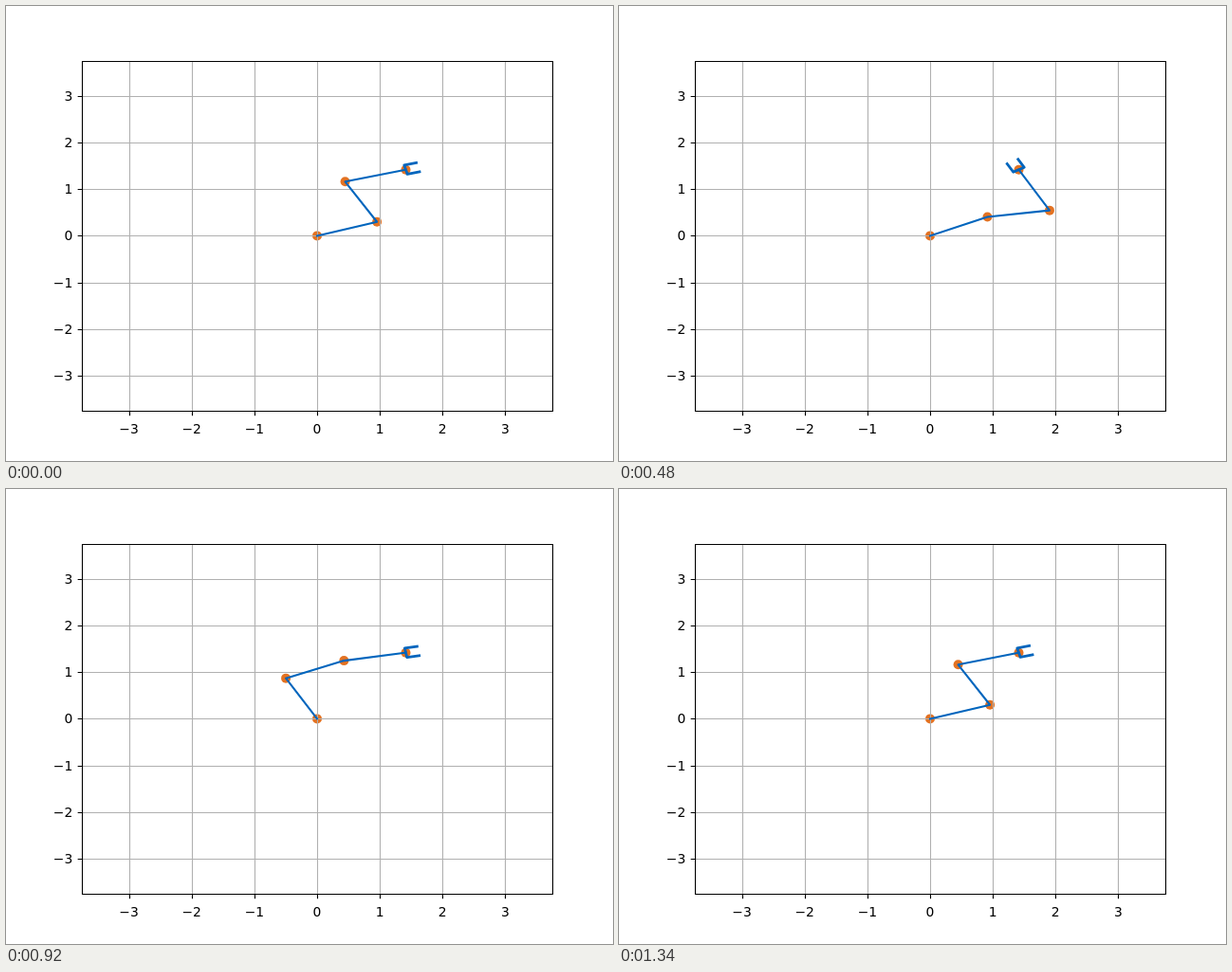
Recreate the animation shown at these times as an HTML page. Size 640 by 480 pixels, loop 1360 ms.

```html
<!DOCTYPE html>
<html lang="en">
<head>
<meta charset="utf-8">
<title>Three-link arm</title>
<style>
  html, body { margin: 0; width: 100%; height: 100%; overflow: hidden; background: #fff; }
  svg { display: block; width: 640px; height: 480px; }
  text { font: 13.89px "DejaVu Sans", sans-serif; }
  #grid, #axes { fill: none; stroke-width: 1.11; }
  #arm, #grip { fill: none; stroke: #0065bd; stroke-linecap: square; stroke-linejoin: round; }
</style>
</head>
<body>
<svg viewBox="0 0 640 480">
  <g id="joints" fill="#e37222"></g>
  <path id="grid" stroke="#b0b0b0"/>
  <path id="arm" stroke-width="2.08"/>
  <path id="grip" stroke-width="2.78"/>
  <path id="axes" stroke="#000"/>
  <g id="labels"></g>
</svg>
<script>
const STEP = 20, FRAMES = 68;
const END = [Math.SQRT2, Math.SQRT2];
const $ = id => document.getElementById(id);
const px = x => 328 + x * 496 / 7.5;
const py = y => 242.4 - y * 369.6 / 7.5;
const snap = v => Math.floor(v + 0.5) + 0.5;
const unit = a => [Math.cos(a), Math.sin(a)];
const add = (p, q, k = 1) => p.map((v, i) => v + k * q[i]);
const path = pts => 'M' + pts.map(([x, y]) => px(x).toFixed(2) + ' ' + py(y).toFixed(2)).join('L');

function make(tag, attrs, parent) {
  const el = document.createElementNS('http://www.w3.org/2000/svg', tag);
  for (const k in attrs) el.setAttribute(k, attrs[k]);
  return parent.appendChild(el);
}

function drawPlot() {
  let grid = '', axes = 'M80.5 58.5H576.5V427.5H80.5Z';
  const label = (n, x, y, anchor) => {
    make('text', { x, y, 'text-anchor': anchor }, $('labels')).textContent = n < 0 ? '\u2212' + -n : n;
  };
  for (let n = -3; n <= 3; n++) {
    const x = snap(px(n)), y = snap(py(n));
    grid += `M${x} 58V427.5M80 ${y}H576.5`;
    axes += `M${x} 427.5v4.86M80.5 ${y}h-4.86`;
    label(n, px(n), 451, 'middle');
    label(n, 70.3, Math.round(py(n) + 5), 'end');
  }
  $('grid').setAttribute('d', grid);
  $('axes').setAttribute('d', axes);
}

// Link angles move along the null space of the Jacobian, so the tip stays put.
const rate = ([a, b, c]) => [Math.sin(c - b), Math.sin(a - c), Math.sin(b - a)];

function advance(q, h) {
  const k1 = rate(q);
  const k2 = rate(add(q, k1, h / 2));
  const k3 = rate(add(q, k2, h / 2));
  const k4 = rate(add(q, k3, h));
  return q.map((v, i) => v + h / 6 * (k1[i] + 2 * k2[i] + 2 * k3[i] + k4[i]));
}

function travel(q, span, n) {
  for (let i = 0; i < n; i++) q = advance(q, span / n);
  return q;
}

// Symmetric pose: outer links parallel, tip two units away.
const bend = Math.acos(0.25);
const tilt = Math.asin(Math.sin(bend) / 2);
const rest = [-tilt, bend, -tilt].map(v => v + Math.PI / 4);

// Links swap roles every sixth of a turn: time until the last two align.
function sixthOfTurn() {
  const h = 0.001;
  let q = rest, t = 0;
  while (q[1] > q[2]) {
    q = advance(q, h);
    t += h;
  }
  const r = rate(q);
  return t - (q[2] - q[1]) / (r[2] - r[1]);
}

const sixth = sixthOfTurn();
const poses = [travel(rest, -0.02 * sixth, 20)];
while (poses.length < FRAMES) {
  poses.push(travel(poses[poses.length - 1], 6 * sixth / (FRAMES - 1), 20));
}

drawPlot();
const dots = Array.from({ length: 4 }, () => make('circle', { r: 5 }, $('joints')));

function draw(time) {
  const [a, , c] = poses[Math.floor(time / STEP) % FRAMES];
  const dir = unit(c), side = [-dir[1], dir[0]];
  const pts = [[0, 0], unit(a), add(END, dir, -1), END];
  pts.forEach(([x, y], i) => {
    dots[i].setAttribute('cx', px(x));
    dots[i].setAttribute('cy', py(y));
  });
  const left = add(END, side, 0.1), right = add(END, side, -0.1);
  $('arm').setAttribute('d', path(pts));
  $('grip').setAttribute('d', path([add(left, dir, 0.2), left, right, add(right, dir, 0.2)]));
}

function tick() {
  draw(performance.now());
  requestAnimationFrame(tick);
}
tick();
</script>
</body>
</html>
```
